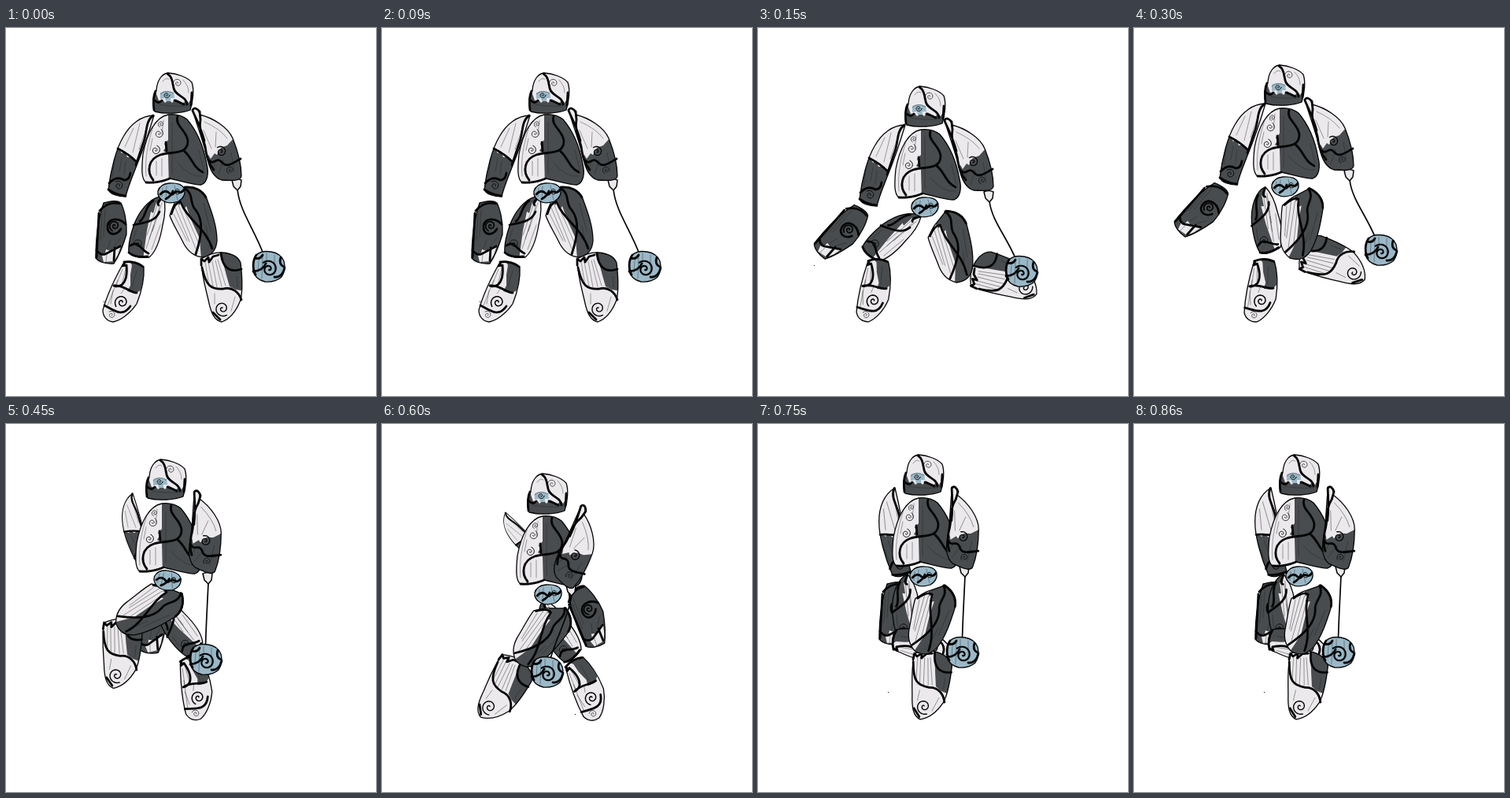
Recreate the animation shown at these times as an HTML page with a canvas. Size 470 by 467 pixels, loop 0.93 s.

```html
<!DOCTYPE html>
<html lang="en">
<head>
<meta charset="utf-8">
<title>Walking golem</title>
<style>
html, body { margin: 0; width: 100%; height: 100%; overflow: hidden; background: #fff; }
canvas { display: block; }
</style>
</head>
<body>
<canvas id="stage" width="470" height="467"></canvas>
<script>
const ctx = document.getElementById('stage').getContext('2d');
const DARK = '#484c4e', PALE = '#ece9ed', BLUE = '#9ab8c7', INK = '#050505';
const STEP = 150, LOOP = 930;

// Parts are drawn in the standing pose; "pivot" lands on each pose [x, y, degrees, scale].
// curls: [x, y, radius, start angle, line width]
const parts = {
  head: {
    pivot: [212, 83],
    body: 'M191 79C192 66 198 58 206 57C217 58 230 62 236 69C239 77 238 92 234 104C224 108 204 110 189 106C185 99 187 90 191 79Z',
    dark: 'M184 94L190 81 194 92 199 91 202 95 207 91 211 95 215 90 219 92 224 96 229 92 232 95 239 84V112H184Z',
    blue: 'M196 82Q203 78 213 82L214 89 209 89 209 93 203 93 202 89 196 90Z',
    thick: 'M205 58C213 63 211 73 214 79C218 87 229 87 230 97M190 80Q186 88 188 104M189 92Q194 97 198 92M214 92Q221 94 226 97M236 82L235 98',
    fine: 'M199 68Q203 62 207 65M225 66Q232 73 232 82M196 84Q203 77 213 83M194 97Q210 100 228 99',
    curls: [[218, 70, 6, 2.5, .7], [204, 85, 4, 0, 1]],
    poses: [[212, 83], [212, 100], [191, 73], [203, 71], [210, 89], [210, 65]]
  },
  torso: {
    pivot: [214, 153],
    body: 'M206 110C190 113 179 133 174 160C172 180 172 192 178 196C186 198 196 195 208 191C222 194 238 199 248 199C256 196 258 184 255 173C251 150 242 130 230 116C222 110 214 109 206 110Z',
    dark: 'M206 105H262V203H207L206 160 200 156 203 151 201 147 206 142Z',
    thick: 'M218 112C214 124 229 129 231 143C231 162 211 156 196 161C181 166 178 182 187 193M225 155C236 163 237 177 250 183M203 145L204 156M178 196Q194 197 208 191',
    fine: 'M187 125C180 146 176 168 178 188M200 117L198 135M191 169V187M198 166V188M217 170Q235 191 250 188M211 120V185M245 155L251 179M186 140L183 155',
    curls: [[190, 155, 6, 5, 1], [194, 134, 6, 5.2, .8], [197, 122, 4, 2, .7]],
    poses: [[214, 153], [215, 172], [193, 145], [206, 144], [212, 160], [212, 137]]
  },
  hip: {
    pivot: [209, 209], fill: BLUE,
    body: 'M193 207Q196 198 207 197Q222 196 226 203Q230 213 219 220Q207 224 199 219Q192 214 193 207Z',
    thick: 'M196 211Q202 204 208 210C212 215 214 205 219 208Q223 210 226 205M203 217Q210 213 212 207',
    fine: 'M204 201L203 217M214 200L218 218M199 203L198 214',
    curls: [[218, 207, 4, 1, 1]],
    poses: [[209, 209], [211, 227], [191, 201], [204, 198, 10], [210, 216], [209, 193]]
  },
  upperArmL: {
    pivot: [188, 111],
    body: 'M188 111C172 111 158 122 149 138C140 153 133 180 130 205C132 211 142 214 152 214C155 201 160 190 165 177C172 160 180 138 188 111Z',
    dark: 'M134 152L142 151 147 159 151 156 154 164 160 164 164 169 170 166 158 218H124Z',
    thick: 'M187 111C176 119 180 133 174 147Q169 162 165 174M142 153C150 157 159 163 166 170M131 197Q140 187 150 193Q157 193 158 184M130 205Q140 212 152 213',
    fine: 'M162 127L151 151M170 121L161 158M181 120L169 154M147 165L144 182M152 169L150 186M139 162L135 188',
    curls: [[143, 200, 6, 4, 1]],
    poses: [[188, 111], [187, 123], [167, 96], [161, 88, -35, .8], [157, 112, -65, .7], [174, 81, -30]]
  },
  upperArmR: {
    pivot: [240, 102],
    body: 'M237 104C239 101 245 102 246 110C263 114 282 126 288 140C294 155 299 172 299 188C298 194 288 194 274 193C264 190 258 178 255 163C252 148 244 128 237 104Z',
    dark: 'M249 169L257 161 260 166 265 159 268 161 273 152 281 149 290 139 304 196H265Z',
    thick: 'M237 104Q240 99 246 106L247 116C244 133 253 142 254 157Q257 172 264 180M258 168C264 175 267 163 274 170C280 178 287 172 298 166M237 105Q248 128 252 143',
    fine: 'M252 119Q272 128 281 140M251 130L261 153M267 132L266 151M276 167L270 186M286 158L290 183M265 171L263 181',
    curls: [[273, 157, 7, 4, 1.3], [285, 180, 5, 2, .7]],
    poses: [[240, 102], [240, 115], [220, 89], [243, 85, 22], [257, 104, 42], [250, 80, 22]]
  },
  forearmL: {
    pivot: [133, 260],
    body: 'M124 222C132 220 141 218 146 222C150 230 154 246 153 262C149 275 143 290 137 299C128 300 118 297 114 292C114 270 116 245 124 222Z',
    fill: DARK,
    pale: 'M122 289L126 286 127 281 133 283 137 279 140 281 146 276 142 288 137 296 124 297Z',
    thick: 'M119 232Q130 219 145 223M118 235L115 291M152 249C145 241 131 240 129 251C128 264 141 264 146 255M115 282Q120 289 126 287L145 277M138 279L137 295',
    fine: 'M122 237L120 270M126 230L124 265M146 266L138 276M133 269L129 280M128 288L127 297',
    curls: [[138, 251, 7, 2, 1.7]],
    poses: [[133, 260], [106, 260, 38], [86, 232, 38], [184, 252, -8], [262, 245, -26], [173, 241]]
  },
  thighL: {
    pivot: [179, 253],
    body: 'M200 214C186 213 172 228 164 246C158 262 155 275 156 285C160 291 170 292 182 291C190 284 196 268 199 250C202 238 203 224 200 214Z',
    dark: 'M203 209L194 224 191 221 187 235 184 233 179 257 174 294H148V209Z',
    thick: 'M199 215Q190 222 194 225M162 250C176 247 190 246 195 233M158 276C169 269 171 282 181 286M187 219C176 226 178 241 170 245M156 285Q164 292 180 290',
    fine: 'M198 222L186 258M195 227L182 268M192 225L179 263M196 250L185 281M166 255L161 270M188 250L178 280',
    curls: [[168, 274, 6, 3, .8]],
    poses: [[179, 253], [169, 262, 31], [166, 246, -27], [217, 258, -55], [222, 264, -50], [187, 235, -24]]
  },
  thighR: {
    pivot: [238, 247],
    body: 'M227 202C240 200 250 206 254 214C262 235 268 252 268 270C267 282 262 288 250 291C240 290 232 285 226 274C218 258 211 247 208 238C211 230 213 222 217 218Z',
    dark: 'M215 219L220 225 223 220 227 229 229 226 235 243 246 267 248 294H275V196H215Z',
    thick: 'M226 203C240 210 232 223 241 231C251 244 249 263 241 287M210 236Q215 220 222 221M222 221C230 243 254 254 262 280M227 202Q246 201 254 215',
    fine: 'M215 228L233 271M219 225L241 280M213 236L230 270M224 226L246 276M251 223L260 258M254 250L259 277',
    curls: [],
    poses: [[238, 247], [245, 278, 6], [210, 248, 30], [181, 234, 80], [201, 267, 58], [218, 247, 38]]
  },
  shinL: {
    pivot: [149, 334],
    body: 'M150 297C158 295 168 297 175 303C176 318 172 335 166 350C158 362 146 371 136 373C128 372 123 366 123 358C128 340 138 318 150 297Z',
    dark: 'M156 294L160 301 158 313 158 327 154 334 164 337 171 333 180 298Z',
    thick: 'M151 298L148 302 153 301C154 310 154 320 147 326Q141 329 137 327M125 352C137 358 148 368 158 353M137 327C150 326 158 336 166 336M150 297Q164 295 174 303',
    fine: 'M148 306L140 326M152 306L147 326M142 320L129 352M136 333L133 350M151 330L146 337M166 308L160 329',
    curls: [[147, 348, 9, 2.5, 1.5], [134, 364, 5, 4, .6]],
    poses: [[149, 334], [146, 332, -11], [160, 332, -13], [239, 334, -30], [258, 336, -44], [209, 284, -95]]
  },
  shinR: {
    pivot: [274, 329],
    body: 'M248 293C256 288 266 284 275 285C286 286 295 290 298 298C300 315 301 332 298 345C293 358 285 369 274 373C264 371 260 360 257 345C253 328 248 312 248 293Z',
    dark: 'M270 282L276 299 280 314 284 328 292 332 304 334V280Z',
    thick: 'M248 301L248 293 252 296 257 291 258 297 263 290 270 288M273 286C275 304 284 311 299 306M249 304C254 327 260 332 276 331C287 328 296 335 299 345M263 361L272 370',
    fine: 'M253 297L258 327M257 297L263 328M262 296L268 329M266 295L274 328M269 294L279 327M293 315L294 329M265 337L265 350M291 341L286 359',
    curls: [[275, 356, 10, 1, 1.4]],
    poses: [[274, 329], [314, 319, -65], [254, 299, -63], [144, 292, 10], [152, 337, 37], [216, 332, 13]]
  },
  ball: {
    pivot: [333, 303], fill: BLUE,
    body: 'M318 288Q324 282 337 284Q349 286 353 296Q356 307 350 316Q342 323 329 322Q317 319 314 309Q313 296 318 288Z',
    thick: 'M318 288C313 295 313 306 317 313M316 292Q323 294 326 288M314 309Q326 308 330 299M341 316Q351 317 354 304M349 291Q346 300 353 303',
    fine: 'M326 288L325 318M331 286L331 300M341 288L341 312M321 295L320 310',
    curls: [[334, 306, 11, 4, 2.2]],
    poses: [[333, 303], [334, 309], [313, 282], [253, 299], [209, 315], [259, 290]]
  }
};
const hands = [[293, 195], [293, 210], [273, 183], [256, 192], [240, 207], [262, 183]];
const specks = [[124, 347], [71, 301], null, null, [245, 368], [165, 340]];
const order = ['forearmL', 'upperArmL', 'thighL', 'shinL', 'shinR', 'thighR', 'torso', 'hip',
               'string', 'ball', 'upperArmR', 'head'];

function spiral(x, y, radius, start) {
  const path = new Path2D();
  for (let a = 0; a <= 10; a += .25) {
    const r = radius * (1 - a / 11);
    path.lineTo(x + r * Math.cos(start + a), y + r * Math.sin(start + a));
  }
  return path;
}

for (const part of Object.values(parts)) {
  for (const key of ['body', 'dark', 'pale', 'blue', 'thick', 'fine'])
    if (part[key]) part[key] = new Path2D(part[key]);
  part.curls = part.curls.map(([x, y, r, a, width]) => ({ path: spiral(x, y, r, a), width }));
}

function fill(path, color) {
  if (!path) return;
  ctx.fillStyle = color;
  ctx.fill(path);
}

function stroke(path, width, color = INK) {
  ctx.lineWidth = width;
  ctx.strokeStyle = color;
  ctx.stroke(path);
}

function drawPart(part, pose) {
  const [x, y, degrees = 0, scale = 1] = part.poses[pose];
  ctx.save();
  ctx.translate(x, y);
  ctx.rotate(degrees * Math.PI / 180);
  ctx.scale(scale, scale);
  ctx.translate(-part.pivot[0], -part.pivot[1]);
  fill(part.body, part.fill || PALE);
  ctx.save();
  ctx.clip(part.body);
  fill(part.dark, DARK);
  fill(part.pale, PALE);
  fill(part.blue, BLUE);
  stroke(part.fine, .7, '#2229');
  ctx.restore();
  stroke(part.body, 1.3);
  stroke(part.thick, 2.8);
  for (const curl of part.curls) stroke(curl.path, curl.width);
  ctx.restore();
}

function drawString(pose) {
  const [x, y] = hands[pose], [bx, by] = parts.ball.poses[pose];
  const dx = bx - x, dy = by - y, reach = 1 - 17 / Math.hypot(dx, dy);
  const hand = new Path2D(`M${x - 6} ${y - 2}Q${x} ${y - 5} ${x + 6} ${y - 2}L${x + 5} ${y + 6}L${x + 1} ${y + 11}L${x - 4} ${y + 6}Z`);
  const cord = new Path2D();
  cord.moveTo(x + 1, y + 10);
  cord.bezierCurveTo(x + dx * .1, y + dy * .35, x + dx * .55, y + dy * .55, x + dx * reach, y + dy * reach);
  stroke(cord, 1.7);
  fill(hand, PALE);
  stroke(hand, 1.5);
}

function draw(pose) {
  ctx.fillStyle = '#fff';
  ctx.fillRect(0, 0, 470, 467);
  ctx.lineCap = ctx.lineJoin = 'round';
  for (const name of order) {
    if (name === 'string') drawString(pose);
    else drawPart(parts[name], pose);
  }
  if (specks[pose]) {
    ctx.fillStyle = INK;
    ctx.fillRect(...specks[pose], 1, 1);
  }
}

function tick() {
  draw(Math.min(5, Math.floor(performance.now() % LOOP / STEP)));
  requestAnimationFrame(tick);
}
tick();
</script>
</body>
</html>
```
